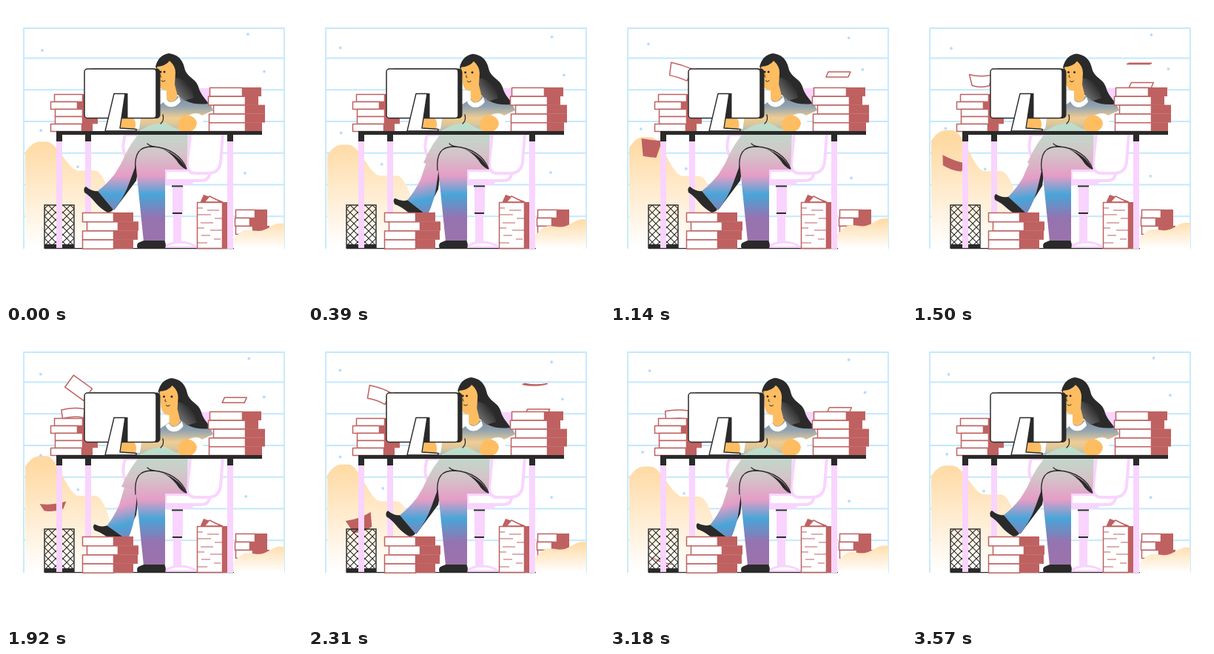
Write an HTML page that moves like this. It is 400x400 px and loops after 3.6 s.

```html
<!DOCTYPE html>
<html lang="en">
<head>
<meta charset="utf-8">
<title>Desk work</title>
<style>
html, body { margin: 0; width: 100%; height: 100%; overflow: hidden; background: #fff; }
svg { display: block; width: 100vw; height: 100vh; }
.ink { fill: #2a2a2a; }
.line { fill: none; stroke: #2a2a2a; stroke-width: 1.3; stroke-linecap: round; }
.pink { fill: #f9d4ff; }
.tube { fill: #fff; stroke: #f9d4ff; stroke-width: 4; }
.skin { fill: #ffbd62; }
.red { fill: #bf6161; }
.page { fill: #fff; stroke: #bf6161; stroke-width: 1.5; stroke-linejoin: round; }
</style>
</head>
<body>
<svg viewBox="0 0 400 400">
  <defs>
    <linearGradient id="sand" gradientUnits="userSpaceOnUse" x1="0" y1="180" x2="0" y2="326">
      <stop offset="0" stop-color="#ffd9a2"/><stop offset="1" stop-color="#fff"/>
    </linearGradient>
    <linearGradient id="sand2" gradientUnits="userSpaceOnUse" x1="0" y1="286" x2="0" y2="328">
      <stop offset="0" stop-color="#ffd9a2"/><stop offset="1" stop-color="#fff"/>
    </linearGradient>
    <linearGradient id="denim" gradientUnits="userSpaceOnUse" x1="0" y1="160" x2="0" y2="318">
      <stop offset="0" stop-color="#b9e0cd"/><stop offset=".24" stop-color="#d2c6c8"/>
      <stop offset=".44" stop-color="#e59dc6"/><stop offset=".6" stop-color="#48a5d8"/>
      <stop offset=".8" stop-color="#9573b0"/><stop offset="1" stop-color="#9b73ac"/>
    </linearGradient>
    <linearGradient id="wool" gradientUnits="userSpaceOnUse" x1="0" y1="122" x2="0" y2="169">
      <stop offset="0" stop-color="#7d8c9c"/><stop offset=".3" stop-color="#93a4b0"/>
      <stop offset=".62" stop-color="#f0cd92"/><stop offset=".8" stop-color="#dcc69c"/>
      <stop offset="1" stop-color="#a9bcb8"/>
    </linearGradient>
    <linearGradient id="hair" gradientUnits="userSpaceOnUse" x1="227" y1="122" x2="247" y2="106">
      <stop offset="0" stop-color="#808080"/><stop offset="1" stop-color="#2a2a2a"/>
    </linearGradient>
    <pattern id="mesh" patternUnits="userSpaceOnUse" x="57" y="269" width="10" height="10">
      <path d="M0 0L10 10M10 0L0 10" stroke="#2a2a2a" stroke-width="1.1"/>
    </pattern>
  </defs>
  <rect width="400" height="400" fill="#fff"/>
  <path id="wall" fill="none" stroke="#c3e8fd" stroke-width="1.8"/>
  <path id="hillL" fill="url(#sand)"/>
  <g id="dots" fill="#b9dbfc"></g>
  <g id="sideBooks"></g>
  <path id="hillR" fill="url(#sand2)"/>

  <!-- chair -->
  <rect class="pink" x="258" y="111" width="22" height="22" rx="4"/>
  <path class="tube" d="M161 174Q155 196 163 204H180V174Z"/>
  <path class="tube" d="M215 222H271Q276 223 275 228Q273 236 264 236H215Z"/>
  <path class="pink" d="M215 234H255Q253 242 246 242H215Z"/>
  <path class="tube" d="M249 172L245 211Q244 226 256 226H273Q288 226 290 211L293 172Z"/>
  <path class="pink" d="M225 245H239V279H225ZM226 281H237V319H226Z"/>
  <path d="M224 243.5H239M225 280H238" stroke="#2a2a2a" stroke-width="2"/>
  <path class="tube" style="stroke-width:3" d="M214 326Q222 319 236 319Q251 320 257 326Z"/>

  <!-- legs -->
  <rect class="pink" x="107" y="180" width="8" height="100"/>
  <path id="shade" class="ink"/>
  <g id="shin">
    <path fill="url(#denim)" d="M168 192Q156 212 147 227Q136 241 124 250L146 276Q160 258 167 238L178 208L184 192Z"/>
    <path class="ink" d="M124 250L145 275Q142 279 137 279Q128 274 121 266Q113 256 106 252Q104 246 108 244Q116 251 124 250Z"/>
  </g>
  <path fill="url(#denim)" d="M190 160Q198 157 214 158L232 163L246 172L244 221H215L180 204L174 216L156 212Q166 186 190 160Z"/>
  <path fill="url(#denim)" d="M176 220C173 198 181 190 197 190Q226 192 244 221H215V318H186Q180 260 176 220Z"/>
  <path class="ink" d="M211 193Q236 202 244 221Q236 218 230 208Q222 198 211 193Z"/>
  <path class="line" d="M175 222C173 198 181 190 197 190C222 191 238 204 244 220M191 186Q195 190 201 190"/>
  <path class="ink" d="M186 317H214Q217 321 215 328H178Q175 321 181 319Z"/>

  <!-- upper body -->
  <path fill="url(#wool)" d="M207 134L222 124Q250 118 264 124Q276 129 280 141L265 148L262 166H230L215 158Q195 158 181 169H155V150H207Z"/>
  <path class="line" d="M212 147Q214 155 209 159"/>
  <g id="handL">
    <path fill="#fff" d="M168 152H182L180 166H168Z"/>
    <path class="skin" d="M153 151H172Q177 158 174 166H157Q152 164 153 151Z"/>
  </g>
  <path fill="#fff" d="M246 148Q258 142 265 148Q269 158 262 167H248Z"/>
  <path class="skin" d="M232 160Q234 149 245 147Q257 150 258 158Q257 167 250 169H237Q231 167 232 160Z"/>
  <g id="head">
    <path class="ink" d="M202 82Q206 66 220 64Q237 66 241 83C244 97 256 97 260 109C263 121 271 126 273 132Q255 134 243 128L216 108Z"/>
    <path fill="url(#hair)" d="M227 96Q240 98 250 108L254 124L241 128L227 114Z"/>
    <path fill="#fff" d="M216 125Q224 136 234 122L236 129Q229 138 220 136Q214 134 212 128Z"/>
    <path class="skin" d="M204 82Q216 81 221 74Q229 81 229 90L228 106L232 122Q226 134 217 126V114Q208 115 206 103Z"/>
    <circle id="eyeL" class="ink" cy="89" r="1.5"/><circle id="eyeR" class="ink" cy="89" r="1.5"/>
    <path id="smile" class="line" style="stroke-width:1"/>
  </g>

  <!-- falling pages and waste bin -->
  <path id="scrap" class="red"/>
  <g id="sheets"></g>
  <rect x="52" y="269" width="40" height="58" fill="url(#mesh)" stroke="#2a2a2a" stroke-width="1.4"/>
  <rect class="ink" x="52" y="322" width="40" height="6"/>
  <path d="M52 327.6H308" stroke="#2a2a2a" stroke-width="1.3"/>
  <g id="books"></g>

  <!-- paper pile -->
  <path class="red" d="M263 264L267 255L293 264V268H263Z"/>
  <path class="page" d="M268 265L275 257L291 265Z"/>
  <rect class="red" x="292" y="265" width="7" height="63"/>
  <rect class="page" x="258.5" y="265.5" width="34" height="62"/>
  <path d="M259 273H266M272 276H288M259 282H277M282 287H292M263 293H280M259 300H268M276 303H292M264 310H276M281 315H290M259 320H272" stroke="#bf6161" stroke-width="1.1"/>

  <!-- monitor and desk -->
  <rect class="ink" x="112" y="84.5" width="96.5" height="67.5" rx="5"/>
  <rect x="106" y="85" width="97" height="66.5" rx="4" fill="#fff" stroke="#2a2a2a" stroke-width="1.5"/>
  <path class="ink" d="M158 118H164.5V152H154Z"/>
  <path d="M146 118.5H161L154 165L176 166.5V169H134Z" fill="#fff" stroke="#2a2a2a" stroke-width="1.4" stroke-linejoin="round"/>
  <path class="pink" d="M68 182H76V327H68ZM299 182H307V328H299Z"/>
  <path class="ink" d="M68 169H346V174H307V183H299V174H115V183H107V174H76V183H68Z"/>
</svg>
<script>
const LOOP = 3600, TAU = Math.PI * 2;
const $ = id => document.getElementById(id);
const set = (el, attrs) => { for (const k in attrs) el.setAttribute(k, attrs[k]); return el; };
const add = (parent, tag, attrs) =>
  parent.appendChild(set(document.createElementNS('http://www.w3.org/2000/svg', tag), attrs));

const lerp = (a, b, u) => a + (b - a) * u;
const step = (a, b, x) => { const u = Math.min(1, Math.max(0, (x - a) / (b - a))); return u * u * (3 - 2 * u); };
const wave = (t, peak, period) => Math.cos((t - peak) / period * TAU);

let wall = 'M24 328V30H376V328';
for (let i = 0; i < 6; i++) wall += `M24 ${70.5 + 42.75 * i}H376`;
set($('wall'), { d: wall });

// each book: left edge, end of pages, end of cover
const stack = (parent, top, h, books) => books.forEach(([x, mid, end], i) => {
  const y = top + i * h;
  add(parent, 'rect', { class: 'red', x: mid, y, width: end - mid, height: h + .3 });
  add(parent, 'rect', { class: 'page', x: x + .5, y: y + .5, width: mid - x, height: h });
});
stack($('books'), 119, 10, [[65, 103, 106], [60, 96, 106], [66, 103, 106], [66, 103, 124], [60, 102, 117]]);
stack($('books'), 110, 11.8, [[275, 319, 345], [273, 323, 341], [280, 323, 350], [274, 323, 350], [274, 323, 346]]);
stack($('books'), 279, 12.2, [[103, 145, 172], [109, 151, 179], [103, 145, 178], [103, 145, 172]]);
stack($('sideBooks'), 275, 11, [[310, 336, 353], [309, 329, 353], [310, 333, 356]]);

// drifting dots: centre, radius, start angle
const dots = [[48.5, 55, 5, 85], [326, 41.5, 3.6, -75], [344.5, 89, 4.5, -5], [44, 168.3, 3.2, -3], [100.5, 217.3, 3.5, 180], [326, 228.5, 4, 220]]
  .map(([x, y, r, a]) => ({ x, y, r, a: a * TAU / 360, el: add($('dots'), 'circle', { r: 1.9 }) }));

const hill = (id, from, to, height) => {
  let d = `M${from} 328`;
  for (let x = from; x <= to; x += 2) d += `L${x} ${height(x)}`;
  set($(id), { d: d + `V328Z` });
};

// a bent sheet: taper narrows the lower edge, skew shifts it
const sheet = ({ x, y, w, h, turn = 0, sag = 0, taper = 0, skew = 0 }) => {
  const a = turn * TAU / 360, c = Math.cos(a), s = Math.sin(a);
  const p = (u, v) => `${x + u * c - v * s} ${y + u * s + v * c}`;
  const half = w / 2, low = half - taper;
  return `M${p(-half, -h / 2)}Q${p(0, -h / 2 + sag)} ${p(half, -h / 2)}L${p(low + skew, h / 2)}Q${p(skew, h / 2 + sag)} ${p(skew - low, h / 2)}Z`;
};

// pops up behind the monitor, then flutters down to the left stack
const toss = age => {
  const rise = step(500, 750, age), u = Math.max(0, (age - 750) / 1290);
  return {
    x: lerp(125, 97, rise) - 7 * u, y: lerp(110, 77, rise) + 40 * u, w: 31, h: 20 - 9 * u,
    turn: 36 * (1 - u) * Math.cos(2.6 * u), sag: -4 * Math.sin(9 * u), taper: 4 * Math.sin(Math.PI * u)
  };
};

// opens while sinking behind the right stack
const drop = age => {
  const u = (age + 170) / 1090;
  return { x: lerp(308, 312, u), y: 71 + 44 * u, w: 30, h: 1 + 6 * step(.12, .5, u), sag: 4 * (1 - step(0, .15, u)), skew: -3 };
};

const sheets = [[0, toss, 500, 2040], [1200, toss, 500, 2040], [780, drop, -170, 920], [1500, drop, -170, 920], [2430, drop, -170, 920]]
  .map(([at, pose, from, to]) => ({ at, pose, from, to, el: add($('sheets'), 'path', { class: 'page' }) }));

const scrapPose = t => ({
  x: lerp(55, 72, step(1300, 2500, t)), y: Math.min(316, 171 + (t - 780) / 17),
  w: lerp(20, 36, step(780, 1500, t)), h: (19 + 10 * wave(t, 780, 2040)) * (1 - step(2850, 3250, t)),
  turn: 20 * wave(t, 1450, 1600), sag: 4 * step(900, 1800, t), taper: 5
});

const show = (el, on) => set(el, { visibility: on ? 'visible' : 'hidden' });

function draw(t) {
  const crest = 181 - 8 * wave(t, 1650, LOOP) - 6 * wave(t, 1650, LOOP / 2);
  const shelf = 228 + 6 * wave(t, 780, 1800);
  hill('hillL', 26, 144, x => lerp(crest, shelf, step(55, 98, x))
    + 14 * (Math.max(0, 45 - x) / 19) ** 2 + 32 * (Math.max(0, x - 120) / 20) ** 2);
  hill('hillR', 300, 376, x => 300 - 10 * step(325, 380, x) - 5 * wave(t, 800, 1800)
    + 2 * Math.sin((x - 336) / 21 * Math.PI) + 16 * (Math.max(0, 325 - x) / 24) ** 2);

  for (const { x, y, r, a, el } of dots) {
    const now = a + t / 1800 * TAU;
    set(el, { cx: x + r * Math.cos(now), cy: y + r * Math.sin(now) });
  }

  // head and foot share one beat
  const turn = (1 - wave(t, 0, 1200)) / 2, swing = step(0, 1, turn);
  set($('shin'), { transform: `rotate(${-15 * swing} 186 208)` });
  set($('shade'), { d: `M${146 + 17 * swing} ${276 + 3 * swing}L176 200H182L176 ${236 + 14 * swing}Z` });
  set($('handL'), { transform: `translate(${Math.sin(t / 600 * TAU)} 0)` });
  set($('head'), { transform: `translate(${4 * turn} ${turn})` });
  set($('eyeL'), { cx: 209 + turn });
  set($('eyeR'), { cx: 214 + 7 * turn });
  set($('smile'), { d: `M${210 + 3 * turn} 101q2.5 2.5 5 0M${209 + 3 * turn} 93q-1.5 3 1 3` });

  for (const { at, pose, from, to, el } of sheets) {
    const age = t - at;
    show(el, age > from && age < to);
    set(el, { d: sheet(pose(age)) });
  }
  show($('scrap'), t > 480 && t < 3250);
  set($('scrap'), { d: sheet(scrapPose(t)) });
}

const start = performance.now();
function tick() {
  draw((performance.now() - start) % LOOP);
  requestAnimationFrame(tick);
}
tick();
</script>
</body>
</html>
```
